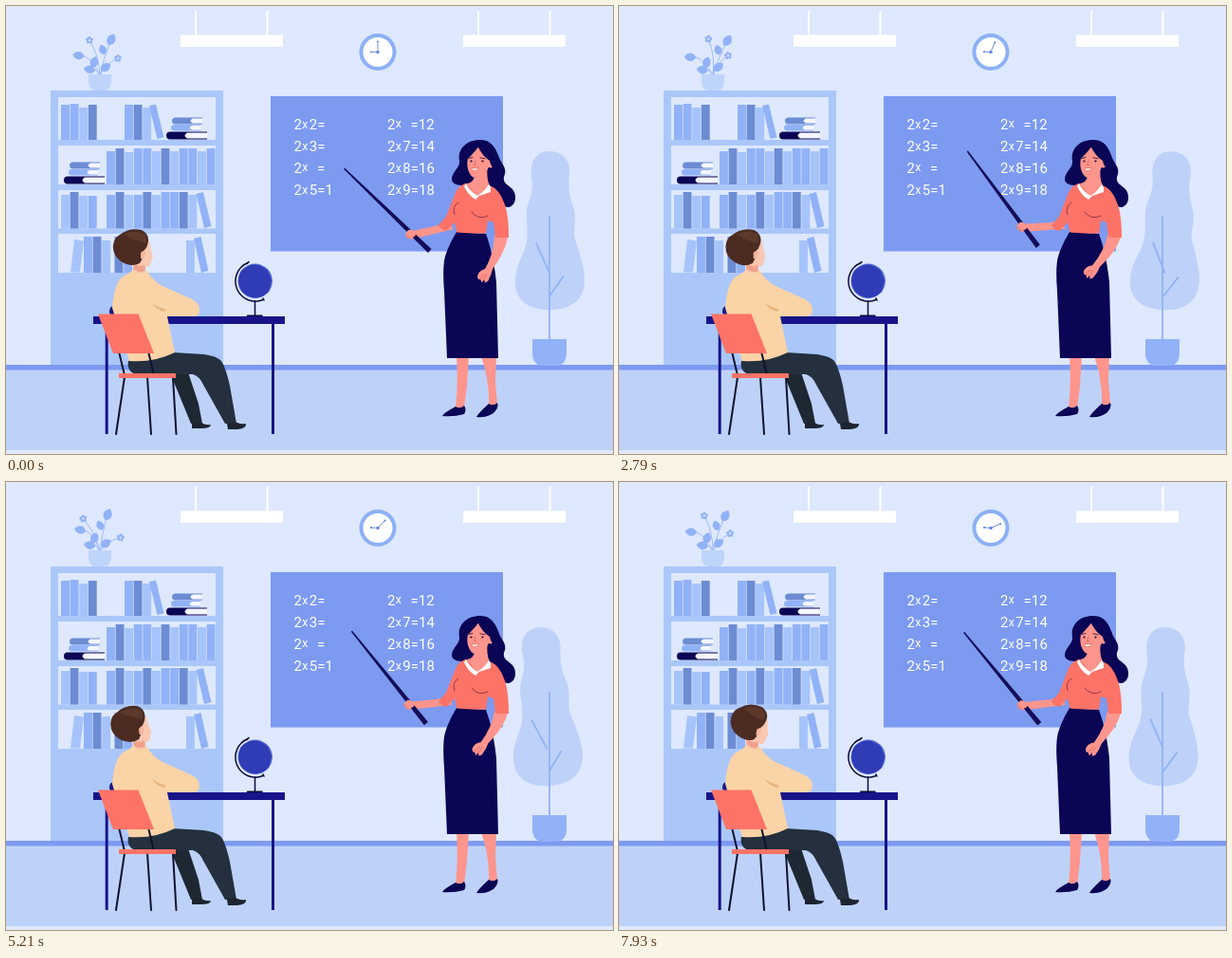
Animation of 640x472 px, one loop 8000 ms. Source, as an HTML page:

```html
<!DOCTYPE html>
<html lang="en">
<head>
<meta charset="utf-8">
<title>Maths lesson</title>
<style>
html, body { margin: 0; width: 100%; height: 100%; overflow: hidden; background: #dee8fe; }
svg { display: block; width: 100%; height: 100%; }
text { font: 15px Roboto, sans-serif; fill: #fff; }
.times { font-size: 12.5px; }
</style>
</head>
<body>
<svg id="stage" viewBox="0 0 640 472" preserveAspectRatio="none"></svg>
<script>
const NAVY = '#0a0554', CORAL = '#fd7367', SKIN = '#ff958c', PALE = '#dee8fe',
      SHELF = '#abc7fa', BLUE = '#91b2f7', MID = '#a6c4fb', DARK = '#6c8cd3', BOARD = '#7d9af1';

const rect = (x, y, x2, y2, fill) =>
  `<rect x="${x}" y="${y}" width="${x2 - x}" height="${y2 - y}" fill="${fill}"/>`;
const shape = (d, fill, more = '') => `<path d="${d}" fill="${fill}" ${more}/>`;
const line = (d, stroke, width = 1) =>
  `<path d="${d}" fill="none" stroke="${stroke}" stroke-width="${width}" stroke-linecap="round"/>`;
const dot = (x, y, r, fill) => `<circle cx="${x}" cy="${y}" r="${r}" fill="${fill}"/>`;
const group = (id, body) => `<g id="${id}">${body}</g>`;

function lamp(x) {
  return rect(x + 15, 5, x + 17, 31, '#fff') + rect(x + 90.5, 5, x + 92.5, 31, '#fff')
    + rect(x, 30.5, x + 108, 43, '#fff');
}

// Each code is a colour and the drop of the book's top edge, laid out left to right.
function books(x, base, top, codes) {
  const fills = { b: BLUE, m: MID, d: DARK };
  return codes.split(' ').map((code, i) =>
    rect(x + i * 9.6, top + +code[1], x + i * 9.6 + 8.9, base, fills[code[0]])).join('');
}

function stack(x, y) {
  const layer = (l, t, r, b, cover) =>
    shape(`M${l + 4} ${t}H${r}V${b}H${l + 4}Q${l} ${b} ${l} ${(t + b) / 2}Q${l} ${t} ${l + 4} ${t}`, cover)
    + shape(`M${l + 22} ${t + 1}H${r}V${b - 1}H${l + 22}Q${l + 17} ${(t + b) / 2} ${l + 22} ${t + 1}`, '#f4f7ff');
  return layer(x + 6, y, x + 38, y + 7, DARK)
    + layer(x + 5, y + 7.5, x + 36, y + 14, BLUE)
    + layer(x, y + 15, x + 43, y + 23, NAVY);
}

function bookcase() {
  const bays = [[96, 141], [147, 188], [194, 234.5], [240, 281]];
  return rect(47, 89, 229, 378, SHELF)
    + bays.map(([a, b]) => rect(55, a, 221, b, PALE)).join('')
    + books(58, 141, 103, 'b1 b0 m4 d1') + books(125, 141, 103, 'b1 d1 m4')
    + shape('M151 105l7-1.5 8.5 35-7 1.5z', BLUE) + stack(169, 117.5)
    + stack(61, 164.5) + books(106, 188, 150, 'b3 d0 m4 b0 b0 m3 d0 m3 b0 b0 m3 b0')
    + books(58, 234.5, 196, 'm3 d0 m4 b4') + books(106, 234.5, 196, 'b3 d0 m3 b3 d0 m3 b0 b0 d0 m3')
    + shape('M200.5 198l7.5-2 8.5 36-7.5 2z', BLUE)
    + shape('M72 246l10 1.5-4 33h-10z', MID) + books(82, 281, 243, 'b0 d0 m4')
    + books(114.5, 281, 243, 'd0 b0') + books(190, 281, 243, 'm4')
    + shape('M198 245l7.5-2 8 36-7.5 2z', BLUE);
}

const leaf = (x, y, angle, size = 1) =>
  shape('M0 0C-6-3-6-9 0-13C6-9 6-3 0 0', BLUE, `transform="translate(${x} ${y}) rotate(${angle}) scale(${size})"`);
function blossom(x, y) {
  let petals = '';
  for (let i = 0; i < 5; i++)
    petals += dot(x + 2.5 * Math.sin(i * 1.257), y - 2.5 * Math.cos(i * 1.257), 1.6, BLUE);
  return petals + dot(x, y, .8, PALE);
}
function vase() {
  return group('stem0', line('M99 73Q98 52 89 38', BLUE, .8) + blossom(88, 36))
    + group('stem1', line('M99 73Q103 55 109 40', BLUE, .8) + leaf(108, 41, 28) + leaf(104, 51, -22, .85))
    + group('stem2', line('M99 73Q106 60 116 56', BLUE, .8) + blossom(118, 55))
    + group('stem3', line('M99 73Q92 56 82 52.5', BLUE, .8) + leaf(82.5, 53, -82, .95))
    + group('stem4', leaf(91, 65, 18, .95) + leaf(94, 68, -80, .95) + leaf(100, 68, 55, .95)
      + line('M99 73Q97 69 91 64', BLUE, .8))
    + shape('M87 72h24v7q0 10-9 10h-6q-9 0-9-10z', '#bfd4fb');
}

function clock() {
  return dot(392, 48.5, 19.5, '#8cb0f6') + dot(392, 48.5, 15.5, '#fff')
    + group('minute', line('M392 48.5V38', '#6c8cd3', .9) + dot(392, 37.5, 1.1, '#6c8cd3'))
    + group('hour', line('M392 48.5H385', '#6c8cd3', .9) + dot(385, 48.5, 1.1, '#6c8cd3'))
    + dot(392, 48.5, 1.7, '#6285dc');
}

function board() {
  const left = ['2=', '3=', '|=', '5=1'];
  const right = ['|=12', '7=14', '8=16', '9=18'];
  const sum = (rest, x, i) => {
    const gap = rest[0] === '|';
    const y = 129.7 + i * 23.2;
    return `<text y="${y}"><tspan x="${x}">2</tspan>`
      + `<tspan class="times" x="${x + 8.8}" y="${y - (gap ? 2.2 : 1.2)}">x</tspan>`
      + `<tspan x="${x + (gap ? 24.5 : 16.3)}" y="${y}">${rest.replace('|', '')}</tspan></text>`;
  };
  return rect(279, 95, 524, 258.5, BOARD)
    + left.map((s, i) => sum(s, 303.5, i)).join('') + right.map((s, i) => sum(s, 402, i)).join('');
}

function plant() {
  return group('crown', shape('M573 153C588 153 596 164 594 178C592 196 596 205 599 214C602 228 597 238 600 246C604 258 610 275 610 288C610 310 596 320 573 320C550 320 537 310 537 290C537 272 547 262 549 248C551 235 548 228 549 215C551 203 557 196 554 180C552 162 560 153 573 153', '#bed2f9')
      + line('M559 250L573 281M587.5 285L573.5 305', BLUE, 1.8))
    + line('M573 222V352', BLUE, 1.8)
    + shape('M555 351h36v14q0 14-12 14h-12q-12 0-12-14z', BLUE);
}

function globe() {
  return line('M255 270.5A21 21 0 0 0 271 309.5', '#0b0b3c', 1.5)
    + line('M254 271.5l2-2M271 308l1 2M262.5 311V326M254.5 326.3H270', '#0b0b3c', 1.5)
    + dot(262.7, 289.7, 18.2, '#5269d2')
    + shape('M248 279Q262 266 276 279L280 289 277 301Q263 314 249 301Q242 290 248 279', '#303bb6');
}

function pupil() {
  const wear = '#24303d', top = '#fad3a7';
  return shape('M172 384L195 440H207L203 419 192 386z', '#1e2833')
    + shape('M129 374Q127 385 137 388H197Q204 390 208 399L231 440H243L236 400Q231 378 226 373Q222 369 209 367L176 365z', wear)
    + shape('M196 440Q202 437 206 439Q211 442 216 441Q216 445 206 445H196zM233 440Q240 437 244 439Q248 441 253 440Q254 445 244 446H234z', '#1d2430')
    + rect(92, 327, 294, 335, '#17148a')
    + rect(104.7, 335, 107.7, 451, '#17148a') + rect(280, 335, 283, 451, '#17148a')
    + shape('M116 298q3-3 4 0l-3 7zM114 316q-5 0-5 6 0 4 5 4z', '#1b1a86')
    + shape('M134 266L147 268V282Q139 285 134 279z', '#f3a78f')
    + shape('M134 278Q141 281 149 279Q154 289 165 295L196 309Q204 313 204 320Q204 327 198 327H170L178 365Q156 376 130 374L122 350L112 318Q114 292 123 285Q130 282 134 278', top)
    + shape('M154 313Q161 318 169 320L167 322Q158 320 154 313', '#e7b67e')
    + group('head',
        shape('M141 248Q151 243 152 252Q152 257 155 264Q153 266 153 270Q152 276 146 274L145 281Q139 283 135 279L134 264z', '#fac7b0')
      + shape('M135 272Q140 275 146 273L145 280Q139 281 135 277z', '#f0a18b')
      + shape('M120 241Q130 233 143 236Q151 240 150 248Q149 255 145 258Q145 265 141 271Q132 276 121 269Q112 262 113 252Q114 244 120 241', '#4c2b23')
      + shape('M124 241Q135 235 146 240Q149 245 147 250Q135 247 124 241', '#5c392b')
      + shape('M142 260Q147 255 147 261Q146 267 142 266z', '#f7b49d'))
    + line('M119 364L125 389M150 364L156 389', '#10122e', 2)
    + line('M125 391L116 451M149 391L153 451M176 391L179.5 451', '#10122e', 2)
    + shape('M97 324.5H139.5L156 366H113z', CORAL)
    + rect(119, 387, 179, 392, CORAL) + globe();
}

function teacher() {
  return shape('M475 369H488L486 400 483 424H474Q477 398 475 369M501 369H517L516 395 518 420H509Q510 395 501 369', SKIN)
    + shape('M474 422Q479 425 483 421Q486 425 483 430Q472 433 460 432Q461 429 474 422M509 419Q514 422 518 418Q520 423 515 428Q508 434 496 433Q498 429 509 419', NAVY)
    + shape('M500 141C484 141 476 152 478 163C479 171 470 174 470 183C471 189 480 190 488 188L512 190C517 205 523 212 530 212C538 210 539 199 534 193C528 187 524 187 525 180C529 171 523 167 520 160C516 148 511 141 500 141', NAVY)
    + group('arm',
        shape('M466 227L472 235L431 245Q423 247 421 241Q422 237 429 237L456 231z', SKIN)
      + shape('M356 171.7L357.3 170.8L448.5 256L445 260z', '#150d58')
      + shape('M424 236Q430 235 432 240Q432 243 428 244L421 240z', SKIN)
      + line('M422 241l4 4', '#d9645f', .8))
    + shape('M475 238L506 240Q514 262 517 291L519 371H465L462 300Q460 275 463 264Q467 251 475 238', NAVY)
    + group('wrist',
        shape('M515 242L529 243Q527 258 513 277Q512 283 508 290L505 291.5 504 288 502 291.5 500 288 498 288 497 285Q498 279 505 277Q514 262 515 242', SKIN)
      + line('M500 288l4-6M504 288l3-6', '#d9645f', .7))
    + shape('M484 187Q476 190 473 199L464 222 456 231Q459 236 464 237L473 228 475.5 238.5Q490 240 506 239.5L508 226 514 228 516 244H530Q530 218 525 207Q520 193 510 189z', CORAL)
    + line('M477 207Q470 211 473 220M491 217Q498 226 508 221', '#8e2f45', .9)
    + shape('M495 172L508 168Q506 182 510 189L497 201 486 187Q495 186 495 172', SKIN)
    + shape('M485 187L483 190Q487 199 495 204L499 200 511 196 511 191 509 188Q504 196 497 200Q489 195 485 187', '#fff')
    + shape('M489 152Q485 163 487 172Q490 181 495 181Q503 180 509 170Q514 172 513 165L511 158 500 148z', SKIN)
    + shape('M497 147Q502 158 510 163Q511 169 515 171L520 160Q512 143 497 147', NAVY)
    + shape('M500 145Q497 151 487 161L483 163Q485 147 500 145', NAVY)
    + dot(490.5, 163.5, 1.1, '#1c0b38') + dot(502.5, 163.5, 1.1, '#1c0b38')
    + line('M488 160.5l4-1M500 159.8l5 1', '#1c0b38', .8)
    + line('M495 163l-1.5 4.5h2', '#d9574f', .7)
    + shape('M491 170.5Q495 172 498.5 170Q496 175 492 173z', '#fff', 'stroke="#d2463f" stroke-width=".5"');
}

const stage = document.getElementById('stage');
stage.innerHTML = rect(0, 0, 640, 472, PALE) + rect(0, 381, 640, 468, '#bed2f9')
  + lamp(184) + lamp(482) + bookcase() + rect(0, 378, 640, 383.5, BOARD)
  + vase() + clock() + board() + plant() + pupil() + teacher();

// Eased angle through [ms, degrees] poses, flat at every turning point.
function track(poses) {
  const slope = i => (poses[i + 1][1] - poses[i][1]) / (poses[i + 1][0] - poses[i][0]);
  const tangent = i => {
    if (i === 0) return slope(0);
    if (i === poses.length - 1) return slope(i - 1);
    const a = slope(i - 1), b = slope(i);
    return a * b > 0 ? 2 * a * b / (a + b) : 0;
  };
  return t => {
    let i = 0;
    while (i < poses.length - 2 && t >= poses[i + 1][0]) i++;
    const [t0, v0] = poses[i], [t1, v1] = poses[i + 1], d = t1 - t0, u = (t - t0) / d;
    const e = u * u * (3 - 2 * u);
    return v0 + (v1 - v0) * e
      + d * u * (1 - u) * ((1 - u) * tangent(i) - u * tangent(i + 1));
  };
}

const sway = track([[0, 0], [1210, 2.8], [2150, 3.7], [2790, 3.4], [3860, .3], [5210, -3.8], [5850, -4.6], [6140, -4.5], [7930, 1], [8000, 1.2]]);
const point = track([[0, 0], [1710, 0], [2790, 9.5], [3700, 12], [5210, 7.2], [6140, 3.6], [7050, .2], [7930, 6.6], [8000, 7.2]]);
const nod = track([[0, 0], [1300, 14], [2790, -1], [4500, -10], [6140, 2], [7500, 12.5], [7930, 11], [8000, 10.5]]);

const turn = (id, angle, x, y) =>
  document.getElementById(id).setAttribute('transform', `rotate(${angle.toFixed(3)} ${x} ${y})`);
const stemGains = [2.8, 1.5, -2.6, -1.2, -.5];
const LOOP = 8000, RATE = 14;

function draw(now) {
  const t = Math.floor(((now % LOOP) + 6) * RATE / 1000) * 1000 / RATE % LOOP;
  const wind = sway(t), reach = point(t);
  turn('crown', wind, 573, 320);
  stemGains.forEach((gain, i) => turn('stem' + i, wind * gain, 99, 73));
  turn('arm', reach, 473, 226);
  turn('wrist', reach * 1.1, 523, 243);
  turn('head', nod(t), 141, 278);
  turn('minute', t * .0084, 392, 48.5);
  turn('hour', t * .0007, 392, 48.5);
}

const start = performance.now();
function tick() {
  draw(performance.now() - start);
  requestAnimationFrame(tick);
}
tick();
</script>
</body>
</html>
```
